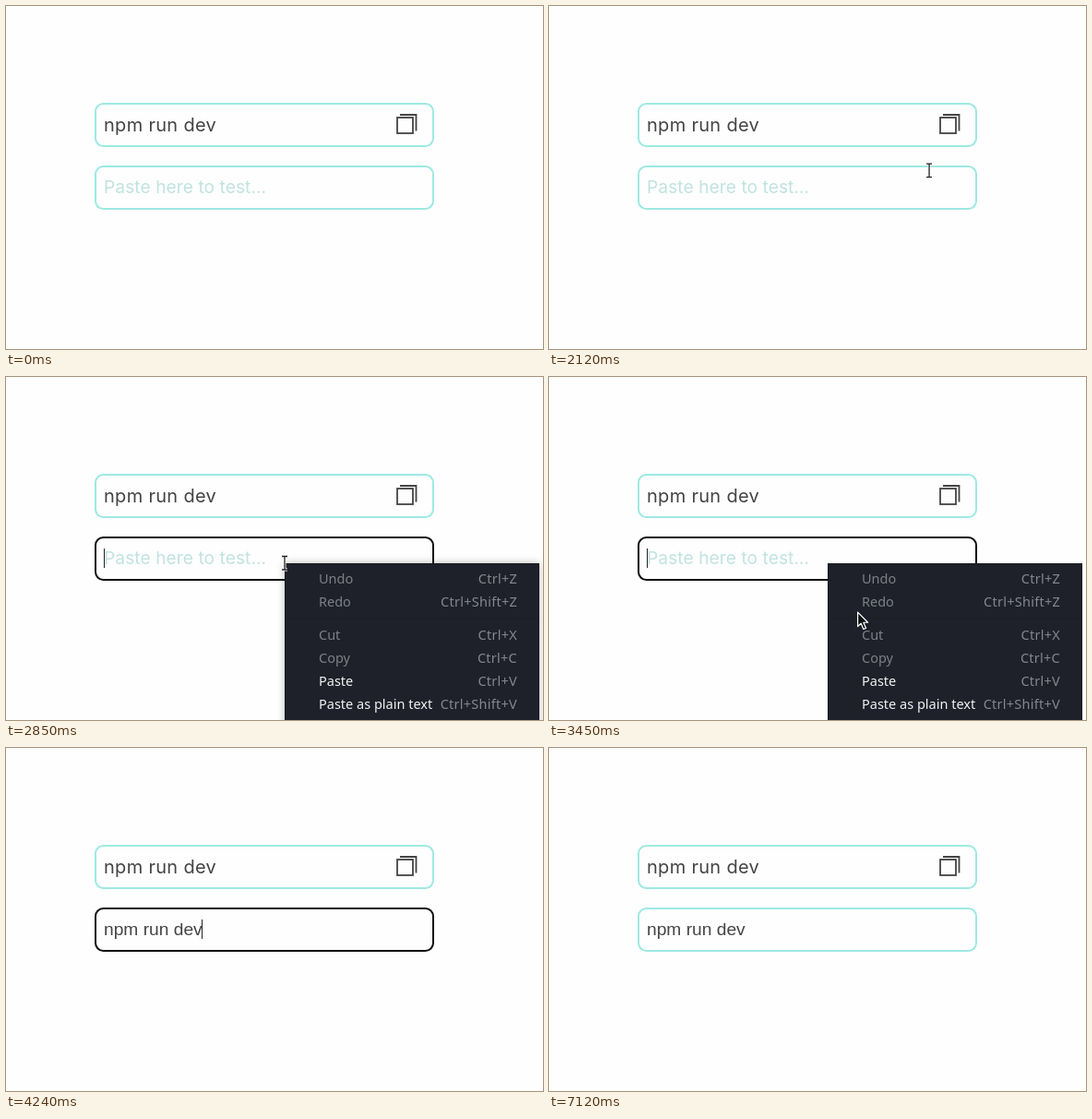
An HTML page with a canvas that plays this animation: 582 px wide and 372 px high, repeating every 7150 ms.

```html
<!DOCTYPE html>
<html lang="en">
<head>
<meta charset="utf-8">
<title>Copy and paste</title>
<style>
  html, body { margin: 0; width: 100%; height: 100%; overflow: hidden; background: #fefefe; }
  canvas { display: block; }
</style>
</head>
<body>
<canvas id="stage" width="582" height="372"></canvas>
<script>
const ctx = document.getElementById('stage').getContext('2d');
const LOOP = 7150, FOCUS = 2850, MENU_MOVE = 2990, PASTE = 4150, BLUR = 7120;
const TEAL = '#9de9e2', INK = '#444446';
const PAGE_FONT = 'Inter, sans-serif';
const MENU_FONT = '14.5px "Noto Sans", sans-serif';

const linear = p => p;
const easeIn = p => p * p;
const easeOut = p => 1 - (1 - p) ** 2;
const smooth = p => p * p * (3 - 2 * p);

// Pointer stops: time, x, y, easing towards this stop
const pointerPath = [
  [580, 556, 161, linear],
  [970, 441, 134, easeOut],
  [1030, 441, 134, linear],
  [1210, 437, 134, smooth],
  [1640, 437, 134, linear],
  [2120, 412.5, 178.5, easeIn],
  [2330, 318, 204, linear],
  [2550, 302, 202, easeOut],
  [MENU_MOVE, 302, 202, linear],
  [4000, 377, 324, smooth],
];

// Menu rows: label, shortcut, baseline, enabled
const menuRows = [
  ['Undo', 'Ctrl+Z', 224, false],
  ['Redo', 'Ctrl+Shift+Z', 249, false],
  ['Cut', 'Ctrl+X', 285, false],
  ['Copy', 'Ctrl+C', 310, false],
  ['Paste', 'Ctrl+V', 335, true],
  ['Paste as plain text', 'Ctrl+Shift+V', 360, true],
];

function pointerAt(t) {
  const next = pointerPath.findIndex(stop => stop[0] > t);
  if (next < 0) return pointerPath[pointerPath.length - 1].slice(1, 3);
  const [t0, x0, y0] = pointerPath[next - 1];
  const [t1, x1, y1, ease] = pointerPath[next];
  const p = ease((t - t0) / (t1 - t0));
  return [x0 + (x1 - x0) * p, y0 + (y1 - y0) * p];
}

function rect(x, y, w, h, color) {
  ctx.fillStyle = color;
  ctx.fillRect(x, y, w, h);
}

function text(str, x, y, font, color, spacing = 0, align = 'left') {
  ctx.font = font;
  ctx.letterSpacing = spacing + 'px';
  ctx.textAlign = align;
  ctx.fillStyle = color;
  ctx.fillText(str, x, y);
}

function field(y, color) {
  ctx.beginPath();
  ctx.roundRect(97, y + 1, 366, 46, 8.5);
  ctx.strokeStyle = color;
  ctx.lineWidth = 2;
  ctx.stroke();
}

function copyIcon() {
  ctx.strokeStyle = INK;
  ctx.lineWidth = 1.8;
  ctx.strokeRect(424, 121, 17, 17);
  ctx.stroke(new Path2D('M427 118H444.5V135.5'));
}

function menu(t, pointerY) {
  const shadow = Math.max(0, 1 - (t - FOCUS) / 600);
  ctx.save();
  ctx.shadowColor = `rgba(60, 55, 35, ${0.35 * shadow})`;
  ctx.shadowBlur = 8;
  rect(302, 202, 276, 180, '#171920');
  ctx.restore();
  rect(303, 203, 274, 169, '#1e212a');
  rect(303, 261, 274, 1, '#1b1e26');
  for (const [label, shortcut, y, enabled] of menuRows) {
    const hover = enabled && pointerY >= y - 18 && pointerY < y + 7;
    if (hover) rect(303, y - 18, 274, 25, '#0ccdd9');
    text(label, 339, y, MENU_FONT, hover ? '#101318' : enabled ? '#f1f2f3' : '#7e8188');
    text(shortcut, 554, y, MENU_FONT, hover ? '#101318' : '#85888f', 0.25, 'right');
  }
}

const arrow = new Path2D('M0 0V15.5L3.6 12.2L6.2 18.5L8.9 17.3L6.2 11.2H11Z');
const beam = new Path2D('M-3 -7.5H3M0 -7.5V7M-3 7H3');
const hand = new Path2D(
  'M-2 10V1C-2 -1.2 1.4 -1.2 1.4 1V6C2 4.8 4.4 5 4.6 6.5C5.4 5.6 7.3 6 7.5 7.3' +
  'C8.5 6.6 10.3 7.2 10.3 8.7V12L8.7 15V17H0.3V15L-5 10.2C-5.8 8.6 -4.2 7.6 -3 8.8Z');

function outline(path, fill, stroke, width) {
  ctx.lineJoin = 'round';
  ctx.lineWidth = width;
  ctx.strokeStyle = stroke;
  ctx.fillStyle = fill;
  ctx.fill(path);
  ctx.stroke(path);
}

function pointer(x, y, t) {
  const inMenu = t > MENU_MOVE;
  const overIcon = !inMenu && x < 447 && y < 153;
  const overInput = !inMenu && x < 464 && y >= 171;
  ctx.save();
  ctx.translate(x, y);
  if (overIcon) {
    outline(hand, '#fff', '#222', 1.2);
    ctx.stroke(new Path2D('M1.4 6V9M4.6 6.5V9.5M7.5 7.3V10'));
  } else if (overInput) {
    outline(beam, 'transparent', '#fff', 3);
    outline(beam, 'transparent', '#222', 1.3);
  } else {
    outline(arrow, '#111', '#fff', 1.2);
  }
  ctx.restore();
}

function draw(t) {
  const focused = t >= FOCUS && t < BLUR;
  const pasted = t >= PASTE;
  rect(0, 0, 582, 372, '#fefefe');

  field(105, TEAL);
  text('npm run dev', 106, 136, '20px ' + PAGE_FONT, INK, 0.3);
  copyIcon();

  field(173, focused ? '#0c0c0e' : TEAL);
  if (pasted) text('npm run dev', 106, 203, '19.2px "Liberation Sans", sans-serif', INK);
  else text('Paste here to test...', 106, 203, '19.2px ' + PAGE_FONT, '#c1e3df', 0.05);
  if (focused) rect(pasted ? 212 : 106, 186, 1, 21, '#222');

  if (t < 580 || pasted) return;
  const [x, y] = pointerAt(t);
  if (focused) menu(t, y);
  pointer(x, y, t);
}

const start = performance.now();
function frame() {
  draw((performance.now() - start) % LOOP);
  requestAnimationFrame(frame);
}
frame();
</script>
</body>
</html>
```
